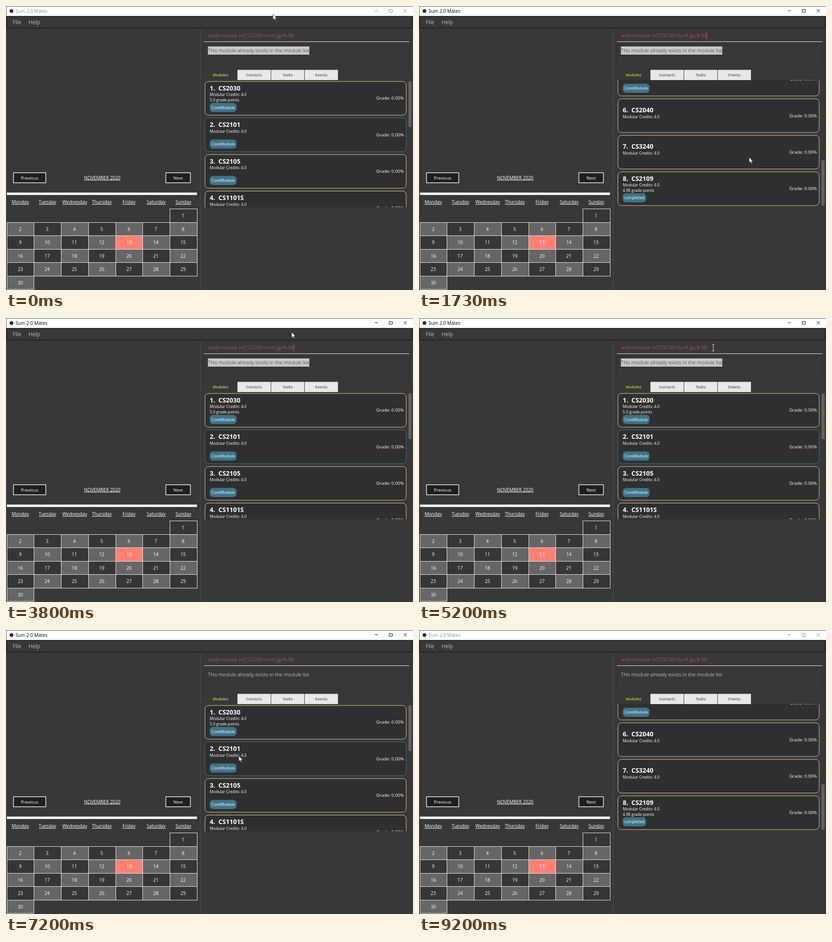
Write an HTML page that moves like this. It is 895 px wide and 625 px high and loops after 9270 ms.

```html
<!DOCTYPE html>
<html lang="en">
<head>
<meta charset="utf-8">
<title>Module planner</title>
<style>
  html, body { margin: 0; width: 100%; height: 100%; overflow: hidden; background: #383838; }
  svg { display: block; width: 895px; height: 625px; }
  text { font-family: "Open Sans", "Noto Sans", sans-serif; white-space: pre; }
</style>
</head>
<body>
<svg id="stage" viewBox="0 0 895 625"></svg>
<script>
const LOOP = 9270;
const CARD_PITCH = 80.4, MAX_SCROLL = 363.8;
const GOLD = '#e6d2a2', TEAL = '#3d7488', WHITE = '#fff';

const rect = (x, y, w, h, fill, extra = '') =>
  `<rect x="${x}" y="${y}" width="${w}" height="${h}" fill="${fill}" ${extra}/>`;
const text = (x, y, str, size, fill = WHITE, extra = '') =>
  `<text x="${x}" y="${y}" font-size="${size}" fill="${fill}" ${extra}>${str}</text>`;
const centered = 'text-anchor="middle"';
const underlined = centered + ' text-decoration="underline"';
const light = 'font-weight="300"';
const bold = 'font-weight="700"';

function titleBar() {
  return rect(0, 0, 895, 22, WHITE) +
    '<circle cx="12" cy="11" r="4.3" fill="#2d3040"/>' +
    '<g id="title">' +
    text(21, 14.8, 'Sum 2.0 Mates', 10.2, 'currentColor') +
    '<path d="M811 10.5h7M842.5 7.5h7v6h-7zM874.5 7l7 7M881.5 7l-7 7" fill="none" stroke="currentColor"/></g>';
}

function menuBar() {
  return rect(1.5, 22.5, 892, 26, '#383838', 'stroke="#0c0c0c"') +
    text(15, 39.8, 'File', 12.2, WHITE, light) +
    text(49.5, 39.8, 'Help', 12.2, WHITE, light);
}

function calendar() {
  const colX = col => Math.round(1.6 + col * 59.75);
  const rowY = row => Math.round(446.1 + row * 29.5);
  const button = (x, w, label) =>
    rect(x, 367, w, 22, '#1f1f1c', 'stroke="#f2f2f2" stroke-width="1.5"') +
    text(x + w / 2, 381.7, label, 9.7, WHITE, centered);

  let out = button(16.5, 71, 'Previous') + button(351.5, 54, 'Next') +
    text(211.5, 381.7, 'NOVEMBER 2020', 10.1, WHITE, underlined) +
    rect(2, 410.5, 418, 5.5, '#f0f0f0');
  ['Monday', 'Tuesday', 'Wednesday', 'Thursday', 'Friday', 'Saturday', 'Sunday'].forEach((day, col) => {
    out += text(31.5 + col * 59.75, 435, day, 10, WHITE, underlined);
  });
  for (let day = 1; day <= 30; day++) {
    const col = (day + 5) % 7, row = Math.floor((day + 5) / 7);
    const x = colX(col), y = rowY(row);
    const fill = day === 13 ? '#ff8073' : day % 2 ? '#363636' : '#666';
    out += rect(x + .5, y + .5, colX(col + 1) - x, rowY(row + 1) - y, fill, 'stroke="#f2f2f2"') +
      text(x + 29.5, y + 18.6, day, 10.2, WHITE, centered);
  }
  return out;
}

function commandPanel() {
  const tabs = ['Modules', 'Contacts', 'Tasks', 'Events'].map((name, i) => {
    const x = 435 + i * 74;
    return (i ? rect(x, 140.5, 73, 22.5, '#e8e8e8', 'rx="1"') : '') +
      text(x + 36.5, 155, name, 8.1, i ? '#757575' : '#8fc33c', centered + ' ' + bold);
  });
  return rect(427, 50, 1, 575, '#4c4c4c') +
    text(444, 69.3, 'addcmodule n/CS3230 mc/4 gp/4.98', 11.5, '#e5604f', light) +
    rect(632.5, 57, 1, 16.5, '#d75b4b', 'id="caret"') +
    rect(435, 78, 452, 1, '#f0f0f0') +
    rect(435.5, 84.5, 451, 54, 'none', 'stroke="#2e2e2e"') +
    rect(444, 89, 223, 18, '#c8c8c8', 'id="selection"') +
    text(444, 102, 'This module already exists in the module list', 11.25, WHITE, light + ' id="reply"') +
    tabs.join('');
}

function card([code, tag, points], i) {
  const top = 166.1 + i * CARD_PITCH;
  const shift = top + (tag ? 0 : 10);
  const tagWidth = tag === 'completed' ? 51 : 59;
  return rect(437.5, top, 442.5, 74, '#2f2f2f', `rx="8" stroke="${i === 1 ? TEAL : GOLD}"`) +
    text(448, shift + 19.8, `${i + 1}.  ${code}`, 13.9, WHITE, bold) +
    text(448, shift + 32.3, 'Modular Credits: 4.0', 8.6) +
    (points ? text(448, top + 44.3, `${points} grade points`, 8.6) : '') +
    (tag ? rect(448, top + 47.2, tagWidth, 20, TEAL, 'rx="7"') +
      text(448 + tagWidth / 2, top + 60.4, tag, 9, WHITE, centered) : '') +
    text(875, top + 40.3, 'Grade: 0.00%', 9.85, WHITE, 'text-anchor="end"');
}

const modules = [
  ['CS2030', 'CoreModule', '5.0'], ['CS2101', 'CoreModule'], ['CS2105', 'CoreModule'],
  ['CS1101S', 'CoreModule'], ['IS1103', 'CoreModule'], ['CS2040'], ['CS3240'],
  ['CS2109', 'completed', '4.98']
];

const stage = document.getElementById('stage');
stage.innerHTML =
  '<clipPath id="listArea"><rect x="435" y="163" width="452" height="280"/></clipPath>' +
  rect(0, 0, 895, 625, '#383838') + titleBar() + menuBar() + calendar() + commandPanel() +
  `<g clip-path="url(#listArea)"><g id="cards">${modules.map(card).join('')}</g></g>` +
  rect(885, 166, 7, 100.5, '#626262', 'rx="1.5" id="thumb"') +
  '<path d="M.5 0V625M0 .5H895" stroke="#3f4c55" fill="none"/>' +
  '<path id="arrow" d="M0 0V12.2L2.8 9.6 4.8 14 6.7 13.2 4.8 8.9H8.7Z" fill="#fff" stroke="#111" stroke-width=".7"/>' +
  '<path id="beam" d="M-2.5 -7H2.5M0 -7V7M-2.5 7H2.5" fill="none" stroke="#e8e8e8"/>';

const el = Object.fromEntries(
  ['title', 'caret', 'selection', 'reply', 'cards', 'thumb', 'arrow', 'beam']
    .map(id => [id, document.getElementById(id)]));

const clamp = k => Math.min(1, Math.max(0, k));
const smooth = k => k * k * (3 - 2 * k);

// The pointer glides through a few resting points.
const stops = [
  { at: 0, x: 587, y: 18 },
  { at: 1000, x: 757, y: 336 },
  { at: 1730, x: 726, y: 333 },
  { at: 3500, x: 690, y: 360 },
  { at: 3800, x: 628, y: 31 },
  { at: 4400, x: 652, y: 64 },
  { at: 5500, x: 646, y: 66 },
  { at: 6130, x: 636, y: 354 },
  { at: 6530, x: 500, y: 206 },
  { at: 7200, x: 512, y: 277 },
  { at: 8330, x: 506, y: 371 },
  { at: 8850, x: 480, y: 640 }
];

function pointer(t) {
  const i = stops.findLastIndex(stop => stop.at <= t);
  const from = stops[i], to = stops[i + 1] || from;
  const k = smooth(clamp((t - from.at) / (to.at - from.at || 1)));
  return [from.x + (to.x - from.x) * k, from.y + (to.y - from.y) * k];
}

// Each wheel spin runs the whole list, alternately down and up.
const spinStarts = [870, 3400, 5900, 6870, 7860];
const SPIN_TIME = 267;
const scrolled = t => spinStarts.reduce(
  (sum, start, i) => sum + (i % 2 ? -1 : 1) * clamp((t - start) / SPIN_TIME), 0);

const show = (node, on) => node.setAttribute('visibility', on ? 'visible' : 'hidden');
const move = (node, x, y) => node.setAttribute('transform', `translate(${x} ${y})`);

function draw(t) {
  const focused = t >= 560 && t < 8980;
  const selected = t < 5660;
  const overInput = t >= 4380 && t < 5620;
  const scroll = scrolled(t);

  el.title.style.color = focused ? '#000' : '#8f8f8f';
  show(el.caret, focused && Math.floor((t + 430) / 500) % 2 === 0);
  show(el.selection, selected);
  el.reply.setAttribute('fill', selected ? '#222' : WHITE);
  move(el.cards, 0, -scroll * MAX_SCROLL);
  move(el.thumb, 0, scroll * 173);
  for (const cursor of [el.arrow, el.beam]) move(cursor, ...pointer(t));
  show(el.arrow, !overInput);
  show(el.beam, overInput);
}

const start = performance.now();
function tick() {
  draw(Math.max(0, performance.now() - start) % LOOP);
  requestAnimationFrame(tick);
}
tick();
</script>
</body>
</html>
```
